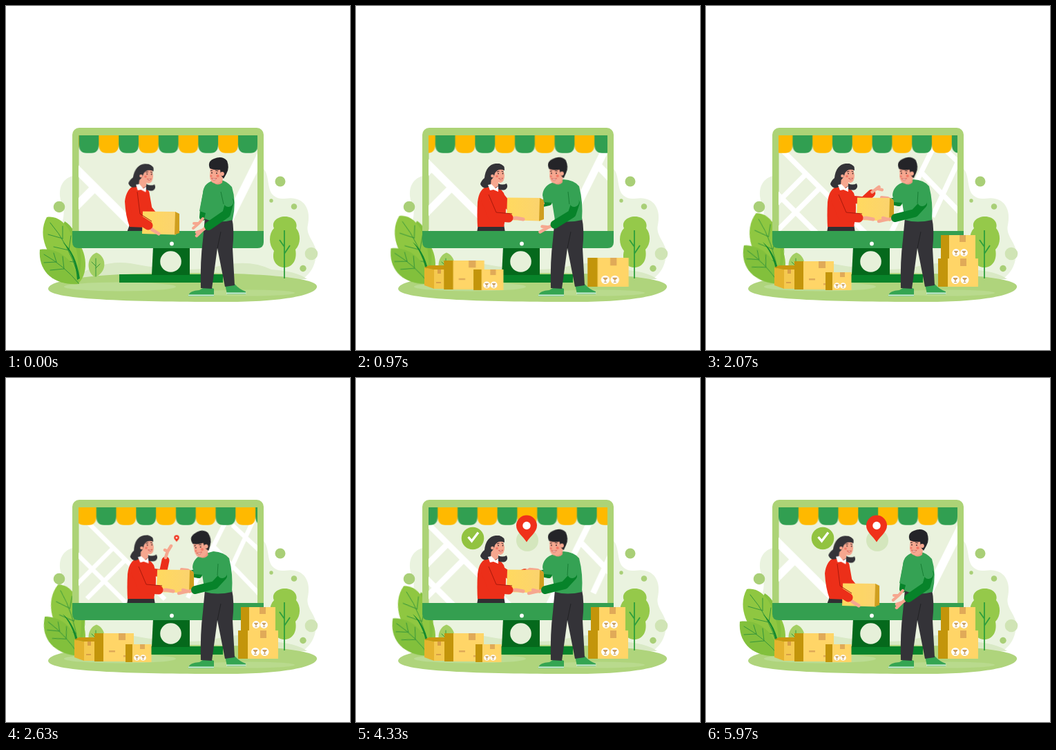
Animation, 498 px wide and 500 px high, one loop 6010 ms. Source, as an HTML page:

```html
<!DOCTYPE html>
<html lang="en">
<head>
<meta charset="utf-8">
<title>Parcel handover</title>
<style>
html, body { margin: 0; width: 100%; height: 100%; overflow: hidden; background: #fff; }
svg { display: block; width: 498px; height: 500px; }

.limb { fill: none; stroke-linecap: round; stroke-linejoin: round; }
.skin { stroke: #f6a78f; }
.red { stroke: #ec2f19; }
.dark { stroke: #07832a; }
.crease { fill: none; stroke: #a81a0c; stroke-width: 1; }
.vein { fill: none; stroke: #35953a; stroke-width: 1; stroke-linecap: round; }

[class*="a-"] { animation: 6010ms ease-in-out infinite; }

.a-awning { animation-name: awning; animation-timing-function: linear; }
@keyframes awning { to { transform: translateX(57.6px); } }
.a-map { animation-name: map; transform-origin: 225px 265px; }
@keyframes map { 0%, 100% { transform: scale(1.9); } 50% { transform: scale(1); } }

.a-leaf { animation-name: sway; transform-origin: 104px 392px; --turn: 11deg; }
.a-leaf.low { transform-origin: 106px 404px; --turn: 8deg; }
@keyframes sway { 50% { transform: rotate(var(--turn)); } }

/* parts that pop in and stay until the loop restarts */
.a-pop { animation-timing-function: linear; }
#crateA { animation-name: popA; transform-origin: 114px 411px; }
#crateB { animation-name: popB; transform-origin: 156px 412px; }
#crateC { animation-name: popC; transform-origin: 191.5px 413px; }
#crateD { animation-name: popB; transform-origin: 365px 408px; }
#crateE { animation-name: popE; transform-origin: 365px 367px; }
#pin { animation-name: popPin; transform-origin: 247px 238px; }
#halo { animation-name: popHalo; transform-origin: 247px 236px; }
#badge { animation-name: popBadge; transform-origin: 169px 233px; }
@keyframes popA { 0%, 5.5% { transform: scale(0); } 9.5% { transform: scale(1.16); } 12.3%, 100% { transform: none; } }
@keyframes popB { 0%, 9.8% { transform: scale(0); } 13.8% { transform: scale(1.16); } 16.6%, 100% { transform: none; } }
@keyframes popC { 0%, 12.1% { transform: scale(0); } 16.1% { transform: scale(1.16); } 18.9%, 100% { transform: none; } }
@keyframes popE { 0%, 20% { transform: scale(0); } 24% { transform: scale(1.16); } 26.8%, 100% { transform: none; } }
@keyframes popPin { 0%, 42.9% { transform: scale(0); } 47% { transform: scale(1.16); } 50%, 100% { transform: none; } }
@keyframes popHalo { 0%, 55% { transform: scale(0); } 63%, 100% { transform: none; } }
@keyframes popBadge { 0%, 55.5% { transform: scale(0); } 59.5% { transform: scale(1.1); } 62%, 100% { transform: none; } }
.a-tick { animation-name: tick; stroke-dasharray: 24; }
@keyframes tick { 0%, 61.5% { stroke-dashoffset: 24; visibility: hidden; } 62% { stroke-dashoffset: 24; visibility: visible; } 67%, 100% { stroke-dashoffset: 0; } }

.a-box { animation-name: box; }
@keyframes box { 0%, 100% { transform: translate(-21px, 20px); } 15%, 85% { transform: none; } }

/* woman */
.a-wHead { animation-name: wHead; transform-origin: 197px 262px; }
@keyframes wHead {
  0%, 100% { transform: translate(-3px, 0) rotate(4deg); }
  15%, 39%, 61%, 85% { transform: none; }
  44%, 56% { transform: rotate(-4deg); }
}
.a-wBody { animation-name: wBody; }
@keyframes wBody {
  0%, 100% { d: path("M186,261 Q174,266 172,284 Q173,305 179,321 L203,322 Q204,292 207,274 Q204,262 197,260Z"); }
  15%, 85% { d: path("M190,262 Q178,266 176,285 Q175,305 176,321 L214,321 Q220,290 214,272 Q208,263 200,261Z"); }
}
.a-skirt { animation-name: skirt; }
@keyframes skirt {
  0%, 100% { d: path("M179,318 L203,319 L201,329 L175,329Z"); }
  15%, 85% { d: path("M177,318 L214,318 L216,329 L175,329Z"); }
}
.a-wNear { animation-name: wNear; }
@keyframes wNear {
  0%, 100% { d: path("M185,276 L189,308 L206,319"); }
  15%, 85% { d: path("M187,280 L198,306 L221,308"); }
}
.a-wHand { animation-name: wHand; }
@keyframes wHand {
  0%, 100% { d: path("M207,321 L213,326 L221,331"); }
  15%, 85% { d: path("M222,309 L232,308 L242,310"); }
}
.a-wFar { animation-name: wFar; }
@keyframes wFar {
  0%, 100% { d: path("M202,272 L206,295 L215,306"); }
  15%, 85% { d: path("M209,276 L222,292 L238,295"); }
  25%, 75% { d: path("M209,278 L226,291 L245,284"); }
  39.6%, 60.4% { d: path("M210,282 L229,280 L238,268"); }
  43.8%, 56.2% { d: path("M210,282 L227,284 L231,265"); }
}
.a-wPalm { animation-name: wPalm; }
@keyframes wPalm {
  0%, 100% { d: path("M215,306 L220,308 L226,310 M220,308 L222,305"); }
  15%, 85% { d: path("M238,295 L244,296 L250,296 M244,296 L247,292"); }
  25%, 75% { d: path("M245,283 L250,281 L254,282 M250,281 L252,280"); }
  39.6%, 60.4% { d: path("M239,266 L246,260 L255,262 M246,260 L250,257"); }
  43.8%, 56.2% { d: path("M231,261 L234,252 L239,244 M234,252 L230,250"); }
}

/* man */
.a-mHead { animation-name: mHead; transform-origin: 306px 258px; }
@keyframes mHead {
  0%, 100% { transform: none; }
  15%, 36%, 64%, 85% { transform: translate(-14px, 0) rotate(-4deg); }
  43.8%, 56.2% { transform: translate(-20px, 2px) rotate(-13deg); }
}
.a-mBody { animation-name: mBody; }
@keyframes mBody {
  0%, 100% { d: path("M299,254 Q286,258 285,272 L280,298 L289,301 L287,309 Q306,317 328,311 Q334,285 327,263 Q319,254 311,253Z"); }
  15%, 85% { d: path("M286,256 Q271,261 270,275 L272,285 L284,286 L288,311 Q306,316 327,311 Q329,285 323,262 Q316,253 300,252Z"); }
}
.a-mSleeve { animation-name: mSleeve; }
@keyframes mSleeve {
  0%, 100% { d: path("M318,267 L322,285"); }
  15%, 85% { d: path("M314,267 L316,285"); }
  24%, 76% { d: path("M314,267 L313,284"); }
}
.a-mNear { animation-name: mNear; }
@keyframes mNear {
  0%, 100% { d: path("M324,284 L319,302 L293,320"); }
  15%, 85% { d: path("M318,286 L313,302 L288,318"); }
  24%, 76% { d: path("M314,288 L302,301 L274,308"); }
}
.a-mHand { animation-name: mHand; }
@keyframes mHand {
  0%, 100% { d: path("M291,321 L284,326 L276,334 M284,326 L276,329"); }
  15%, 85% { d: path("M286,319 L279,322 L267,329 M279,322 L270,321"); }
  24%, 76% { d: path("M272,309 L263,310 L250,313 M263,310 L256,308"); }
}
.a-mFar { animation-name: mFar; }
@keyframes mFar {
  0%, 100% { d: path("M291,268 L286,296 L285,307"); }
  15%, 85% { d: path("M282,270 L279,285 L271,287"); }
  24%, 76% { d: path("M282,270 L279,286 L270,284"); }
}
.a-mPalm { animation-name: mPalm; }
@keyframes mPalm {
  0%, 100% { d: path("M285,309 L279,316 L271,323 M279,316 L272,316"); }
  15%, 85% { d: path("M271,287 L264,288 L258,290 M264,288 L260,287"); }
  24%, 76% { d: path("M270,283 L263,279 L254,278 M263,279 L257,281"); }
}
</style>
</head>
<body>
<svg viewBox="0 0 498 500">
  <defs>
    <clipPath id="screen"><rect x="105.5" y="188" width="258.5" height="139"/></clipPath>
    <pattern id="scallop" patternUnits="userSpaceOnUse" x="105.5" y="188" width="57.6" height="40">
      <path fill="#319f51" d="M0,0H28.8V13Q28.8,25.7 18,25.7H11Q0,25.7 0,13Z"/>
      <path fill="#ffb900" d="M28.8,0H57.6V13Q57.6,25.7 46.8,25.7H39.8Q28.8,25.7 28.8,13Z"/>
    </pattern>
    <linearGradient id="card"><stop stop-color="#ffd95f"/><stop offset="1" stop-color="#fbd36e"/></linearGradient>
    <g id="stamp">
      <circle r="6" fill="#fff"/>
      <path d="M-3,-2.5H3L0,1ZM0,1V3.5M-2,3.5H2" fill="#d9a75c" stroke="#b98a45" stroke-width=".8"/>
    </g>
  </defs>

  <!-- backdrop -->
  <path fill="#eaf3df" d="M78,350C70,325 92,310 80,285C73,262 85,247 103,246L373,237C382,246 377,268 388,276C398,284 408,277 418,280C435,283 441,300 437,318C433,335 451,345 449,362C447,380 440,388 432,395H110Z"/>
  <path fill="#d9e9c5" d="M95,396Q140,368 180,374Q250,388 300,380Q350,366 384,383Q420,385 436,397Z"/>
  <g fill="#a9cf77">
    <circle cx="77" cy="292" r="8.3"/><circle cx="397" cy="255" r="7.5"/><circle cx="384" cy="283" r="2.7"/>
    <circle cx="417" cy="291.500" r="4.300"/><circle cx="430" cy="381.500" r="4.700"/>
  </g>
  <circle cx="442" cy="360" r="9.300" fill="#d0e4b5"/>
  <path fill="#afd47c" d="M61,411C62,397 130,389 240,388C360,387 447,394 450,407C452,420 400,430 320,430C200,430 61,428 61,411Z"/>
  <ellipse cx="165" cy="408" rx="81" ry="6.500" fill="#bbdc93"/>
  <ellipse cx="350" cy="417" rx="68" ry="4.500" fill="#b9da8d"/>

  <!-- tree -->
  <path fill="#95c94a" d="M404,306C416,306 423,315 420,323C427,331 427,346 419,354C422,370 414,380 403,380C392,380 384,370 388,356C380,347 380,331 388,323C384,314 392,306 404,306Z"/>
  <path fill="none" stroke="#2e9f3c" stroke-width="1.800" d="M403,326V396M403,360L411,348M403,350L396,340"/>

  <!-- plants -->
  <path fill="#a3cf63" d="M129,394C116,388 116,364 131,358.500C146,364 147,387 129,394Z"/>
  <path class="vein" d="M130,393V367M130,381L136,375M130,378L124,372"/>
  <path fill="#8ec643" d="M101,403C92,380 90,352 97,336C116,350 122,386 105,403Z"/>
  <g class="a-leaf">
    <path fill="#83c03d" d="M106,392C84,370 76,330 85,313C105,325 113,362 106,392Z"/>
    <path fill="#8fc741" d="M104,392C66,380 42,338 59,307C88,302 108,346 104,392Z"/>
    <path class="vein" d="M104,390Q90,345 64,315M91,355L69,350M82,338L61,332M91,355L94,334M82,338L82,320M98,372L80,370"/>
  </g>
  <g class="a-leaf low">
    <path fill="#82c03c" d="M106,404C72,407 46,388 49,354C80,350 102,374 106,404Z"/>
    <path class="vein" d="M105,403Q85,378 55,361M84,382L64,384M73,372L55,373M84,382L82,364M73,372L69,359"/>
  </g>
  <path fill="#12892f" d="M82,343Q101,358 107,396L103,398Q101,365 82,343Z"/>

  <!-- monitor -->
  <path fill="#08842a" d="M164,390H314V402H164Z"/>
  <path fill="#05691c" d="M213,350H266V391H211Z"/>
  <circle cx="238.500" cy="371.500" r="15.300" fill="#e6f0d9"/>
  <rect x="96" y="177" width="277" height="175" rx="10" fill="#acd376"/>
  <g clip-path="url(#screen)">
    <path fill="#eaf2dd" d="M105,188H365V328H105Z"/>
    <path class="a-map" fill="none" stroke="#fff" stroke-width="6.300" d="M110,200L230,320M174,264.500L120,319M157,247.500L100,305M100,250L175,325M320,201L262,318M356,205L312,300M298,245L370,320M325,215L378,265"/>
    <rect class="a-awning" x="47.900" y="188" width="317" height="26" fill="url(#scallop)"/>
  </g>
  <circle class="a-pop" id="halo" cx="248" cy="236" r="16" fill="#cce2b2" opacity=".75"/>
  <g class="a-pop" id="pin">
    <path fill="#f0301a" d="M247,238.500C242,230 232,224 232,214.500A15,15 0 0 1 262,214.500C262,224 252,230 247,238.500Z"/>
    <circle cx="247" cy="214.500" r="5.700" fill="#fff"/>
  </g>
  <circle class="a-pop" id="badge" cx="169" cy="233" r="16.300" fill="#92c340"/>
  <path class="a-tick" fill="none" stroke="#fff" stroke-width="3.400" d="M162.500,231L167.500,237L177,224.500"/>

  <!-- woman behind the counter -->
  <path class="limb red a-wFar" stroke-width="11"/>
  <path class="limb skin a-wPalm" stroke-width="4.500"/>
  <path class="a-skirt" fill="#303033"/>
  <path class="a-wBody" fill="#ec2f19"/>
  <g class="a-wHead">
    <path fill="#343338" d="M202,229Q213,228 214,238L206,246L206,258Q212,261 218,258Q221,264 216,267Q209,269 203,264Q199,260 194,262Q184,268 180,259Q181,254 186,250Q188,231 202,229Z"/>
    <path fill="#f6a78f" d="M196,247H206L206,261Q202,267 195,261Z"/>
    <path fill="#fff" d="M191,260L196,259L202,265L206,262L206,270L199,267L194,268Z"/>
    <path fill="#f6a78f" d="M197,239Q205,233 213,237L215,246Q215,256 209,257Q199,256 196,248Z"/>
    <path fill="#343338" d="M193,247Q196,228 207,229Q216,231 215,239Q206,235 201,243Q200,250 194,254Z"/>
    <circle cx="197.500" cy="247" r="2.300" fill="#f6a78f"/>
    <path fill="none" stroke="#402c2c" d="M204,241L207.500,240M210.500,240L213.500,241"/>
    <circle cx="206" cy="243.500" r=".9" fill="#402c2c"/><circle cx="212.500" cy="243.500" r=".9" fill="#402c2c"/>
    <circle cx="204" cy="247.500" r="1.800" fill="#f17866"/>
    <path fill="#fff" stroke="#c63b30" stroke-width=".7" d="M206.500,250.500Q209.500,252 212.500,250Q210.500,255 206.500,250.500Z"/>
  </g>

  <!-- counter -->
  <path fill="#349f50" d="M96,327H373V343Q373,352 364,352H105Q96,352 96,343Z"/>
  <circle cx="240" cy="345.500" r="2.900" fill="#fff"/>

  <!-- stacked parcels -->
  <g class="a-pop" id="crateA">
    <path fill="#e5b32d" d="M99,380L113,383V411L99,406Z"/>
    <path fill="#f5c94f" d="M113,383H129V411H113Z"/>
    <path fill="#c9970f" d="M99,380L106,377H129V383H113Z"/>
    <path fill="#d99f47" d="M118,383H123V389H118ZM116,401H123V403H116Z"/>
  </g>
  <g class="a-pop" id="crateB">
    <path fill="#c3950b" d="M128,371H142V412H128Z"/>
    <path fill="#ffd567" d="M141,371H185V412H141Z"/>
    <path fill="#e0aa58" d="M163,371H173V381H163ZM149,396H158V398.500H149ZM170,403H180V405.500H170Z"/>
  </g>
  <g class="a-pop" id="crateC">
    <path fill="#c3950b" d="M173,387H184V413H173Z"/>
    <path fill="#ffd567" d="M183,387H210.500V413H183Z"/>
    <path fill="#e0aa58" d="M194,387H201V394H194Z"/>
    <use href="#stamp" transform="translate(189.500,406.500) scale(.72)"/><use href="#stamp" transform="translate(198.500,406.500) scale(.72)"/>
  </g>
  <g class="a-pop" id="crateD">
    <path fill="#c3950b" d="M336,367H351V408H336Z"/>
    <path fill="#ffd567" d="M350,367H394V408H350Z"/>
    <path fill="#e0aa58" d="M368,367H377V378H368Z"/>
    <use href="#stamp" x="361" y="398"/><use href="#stamp" x="374.500" y="398"/>
  </g>
  <g class="a-pop" id="crateE">
    <path fill="#c3950b" d="M340,333H353V367H340Z"/>
    <path fill="#ffd567" d="M352,333H390V367H352Z"/>
    <path fill="#e0aa58" d="M367,333H376V343H367Z"/>
    <use href="#stamp" transform="translate(362,358.500) scale(.9)"/><use href="#stamp" transform="translate(373.500,358.500) scale(.9)"/>
  </g>

  <!-- handed parcel between the arms -->
  <path class="limb dark a-mFar" stroke-width="10"/>
  <path class="limb skin a-mPalm" stroke-width="4"/>
  <g class="a-box">
    <path fill="url(#card)" d="M219,278.500L267,279V312.500L218,311Z"/>
    <path fill="#cf9f1f" d="M266,279L272,282V310L265,312.500Z"/>
  </g>
  <path class="limb skin a-wHand" stroke-width="5"/>
  <path class="limb red a-wNear" stroke-width="13"/>
  <path class="crease a-wNear" transform="translate(5,-6)"/>

  <!-- man -->
  <path fill="#35a552" d="M264,420Q266,414 280,413L290,407L301,411V422H264ZM317,404L331,404Q338,412 347,415V419H320Z"/>
  <path fill="#d3efd9" d="M264,419.500H301V421.500H264ZM319,416.500H347.500V418.500H319Z"/>
  <path fill="#343338" d="M288,308H327Q331,325 328,352L331,406L317,408L306,352L298,411L282,410Q281,370 285,340Z"/>
  <path fill="none" stroke="#1d1d20" stroke-width=".8" d="M306,352L311,328"/>
  <path class="a-mBody" fill="#35a254"/>
  <g class="a-mHead">
    <path fill="#ef987f" d="M302,248H314L313,257Q306,262 301,257Z"/>
    <path fill="#f6a78f" d="M296,233H314V248Q312,258 303,258Q295,257 295,247Z"/>
    <path fill="#242428" d="M295,236Q291,226 301,222Q313,217 320,225Q324,236 319,244L315,251L311,246L310,238Q302,239 295,236Z"/>
    <circle cx="313" cy="244" r="2.900" fill="#f6a78f"/>
    <path fill="none" stroke="#3a2828" d="M296,239.500L299,239M303,239L307,240"/>
    <circle cx="298" cy="242.500" r=".95" fill="#3a2828"/><circle cx="305" cy="243" r=".95" fill="#3a2828"/>
    <circle cx="306.500" cy="247" r="2.100" fill="#f17866"/><circle cx="297" cy="247" r="1.500" fill="#f17866"/>
    <path fill="#fff" stroke="#c63b30" stroke-width=".7" d="M297.500,250Q301,252 305,250.500Q301,256 297.500,250Z"/>
  </g>
  <path class="limb skin a-mHand" stroke-width="4.500"/>
  <path class="limb dark a-mNear" stroke-width="12"/>
  <path class="limb a-mSleeve" stroke="#35a254" stroke-width="14"/>
  <path class="a-mSleeve" transform="translate(-7,3)" fill="none" stroke="#157a31" stroke-width=".9"/>
</svg>
</body>
</html>
```
